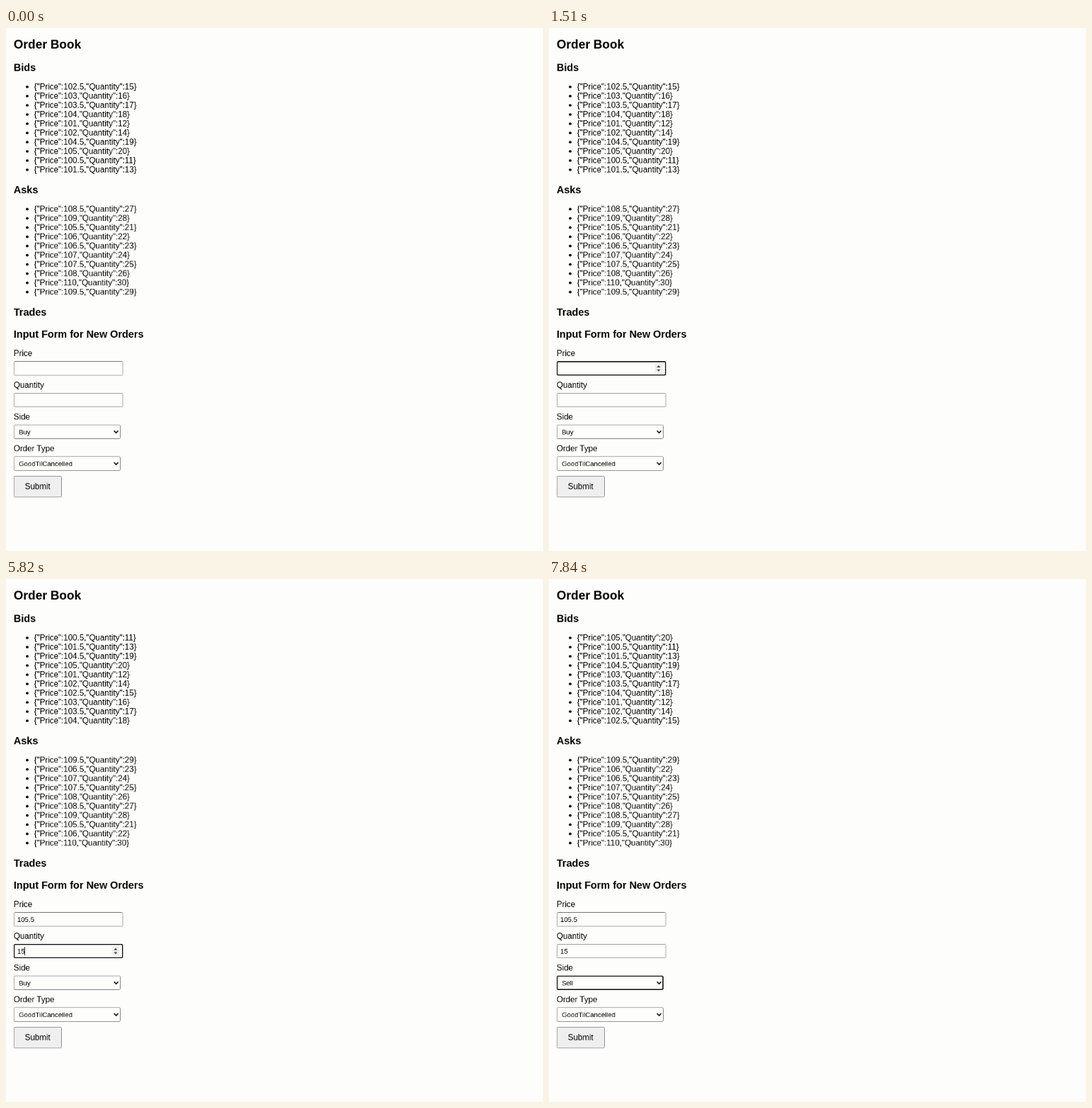
These frames come from a looping animation (759 px wide and 738 px high, 8 s). An HTML page:

```html
<!DOCTYPE html>
<html lang="en">
<head>
<meta charset="utf-8">
<title>Order Book</title>
<style>
  html, body { margin: 0; width: 100%; height: 100%; overflow: hidden; background: #fdfdfc; }
  /* Painted at full size, then scaled down as one layer */
  svg {
    display: block; width: 1051px; height: 1022px; background: #fdfdfc;
    transform: scale(.7222); transform-origin: 0 0; will-change: transform;
  }
  text { font: 16px "Liberation Sans", Arial, sans-serif; fill: #000; white-space: pre; }
  .h2 { font-size: 24px; font-weight: bold; }
  .h3 { font-size: 20px; font-weight: bold; }
  .small { font-size: 13.333px; }
  .float { filter: drop-shadow(0 3px 5px rgba(0, 0, 0, .25)); }
</style>
</head>
<body>
<svg id="stage" viewBox="0 0 1051 1022"></svg>
<script>
const LOOP = 8000;
const LEFT = 15;
const stage = document.getElementById('stage');

function setAttrs(el, attrs) {
  for (const key in attrs) el.setAttribute(key, attrs[key]);
}

function add(tag, attrs, parent = stage) {
  const el = document.createElementNS('http://www.w3.org/2000/svg', tag);
  setAttrs(el, attrs);
  parent.appendChild(el);
  return el;
}

function label(x, y, str, cls = '', parent = stage) {
  const el = add('text', { x, y, class: cls }, parent);
  el.textContent = str;
  return el;
}

const show = (el, on) => el.setAttribute('visibility', on ? 'visible' : 'hidden');
const within = (t, ...spans) => spans.some(([from, to]) => t >= from && t < to);

function setText(el, str) {
  if (el.textContent !== str) el.textContent = str;
}

// Latest value of a [time, value] list
function at(steps, t) {
  let value = steps[0][1];
  for (const [time, next] of steps) if (t >= time) value = next;
  return value;
}

// Orders are listed by quantity; each price follows from it
const bids = [
  [0, [15, 16, 17, 18, 12, 14, 19, 20, 11, 13]],
  [2650, [11, 13, 19, 20, 12, 14, 15, 16, 17, 18]],
  [7630, [20, 11, 13, 19, 16, 17, 18, 12, 14, 15]]
];
const asks = [
  [0, [27, 28, 21, 22, 23, 24, 25, 26, 30, 29]],
  [2680, [29, 23, 24, 25, 26, 27, 28, 21, 22, 30]],
  [7660, [29, 22, 23, 24, 25, 26, 27, 28, 21, 30]]
];
const orderText = q => JSON.stringify({ Price: 95 + q / 2, Quantity: q });

function orderList(top) {
  return Array.from({ length: 10 }, (_, i) => {
    const y = top + 18 * i;
    add('circle', { cx: 41.5, cy: y - 5, r: 2.5 });
    return label(55, y, '');
  });
}

function box(y, width) {
  const frame = add('rect', { rx: 2, fill: 'none' });
  return (focus, hover) => {
    const line = focus ? 2 : 1;
    setAttrs(frame, {
      x: LEFT + line / 2, y: y + line / 2, width: width - line, height: 28 - line,
      stroke: focus ? '#101010' : hover ? '#4f4f4f' : '#767676',
      'stroke-width': line
    });
  };
}

function numberField(y) {
  const spinner = add('g', {});
  add('rect', { x: 207, y: y + 5, width: 15, height: 18, fill: '#efefef' }, spinner);
  add('path', {
    d: `M211 ${y + 12}l3.5 -4 3.5 4zM211 ${y + 16}l3.5 4 3.5 -4z`, fill: '#444'
  }, spinner);
  const frame = box(y, 214);
  const text = label(22, y + 19, '', 'small');
  const caret = add('rect', { y: y + 6, width: 1, height: 16 });
  return (value, focus, hover, blink) => {
    frame(focus, hover);
    setText(text, value);
    show(spinner, focus || hover);
    show(caret, blink);
    if (blink) caret.setAttribute('x', Math.floor(22 + text.getComputedTextLength()));
  };
}

function selectField(y) {
  const frame = box(y, 209);
  const text = label(25, y + 19, '', 'small');
  add('path', {
    d: `M211.5 ${y + 12}l4 4 4 -4`, fill: 'none', stroke: '#000', 'stroke-width': 2
  });
  return (value, focus, hover) => {
    frame(focus, hover);
    setText(text, value);
  };
}

label(LEFT, 40, 'Order Book', 'h2');
label(LEFT, 84, 'Bids', 'h3');
const bidRows = orderList(120);
label(LEFT, 323, 'Asks', 'h3');
const askRows = orderList(359);
label(LEFT, 562, 'Trades', 'h3');
label(LEFT, 605, 'Input Form for New Orders', 'h3');

['Price', 'Quantity', 'Side', 'Order Type'].forEach((name, i) => label(LEFT, 641 + 62 * i, name));
const price = numberField(651);
const quantity = numberField(713);
const side = selectField(775);
const type = selectField(837);

add('rect', { x: 15.5, y: 875.5, width: 93, height: 41, rx: 2, fill: '#efefef', stroke: '#767680' });
label(37, 901, 'Submit');

const tip = add('g', { class: 'float' });
add('rect', { x: 161, y: 745, width: 184, height: 33, rx: 2, fill: '#262728' }, tip);
label(172, 767, 'Please fill out this field.', '', tip).style.fill = '#fff';

const menu = add('g', { class: 'float' });
const menuBack = add('rect', { x: LEFT, y: 803, width: 209, height: 36 }, menu);
const menuItems = add('g', {}, menu);
const menuMark = add('rect', { x: LEFT, width: 209, height: 18, fill: '#1967d2' }, menuItems);
const options = ['Buy', 'Sell'].map((name, i) => label(25, 817 + 18 * i, name, 'small', menuItems));

const priceTyping = [[0, ''], [1730, '1'], [1870, '10'], [2150, '105'], [2330, '105.'], [2840, '105.5']];
const quantityTyping = [[0, ''], [4430, '1'], [4620, '15']];

function draw(t) {
  at(bids, t).forEach((q, i) => setText(bidRows[i], orderText(q)));
  at(asks, t).forEach((q, i) => setText(askRows[i], orderText(q)));

  price(at(priceTyping, t), within(t, [1510, 4230]), within(t, [730, 1510]),
    within(t, [1730, 3290], [3880, 4230]));
  quantity(at(quantityTyping, t), within(t, [4230, 6990]), within(t, [520, 730], [3440, 4230]),
    within(t, [4430, 5220], [5820, 6440]));
  side(t < 7840 ? 'Buy' : 'Sell', t >= 7840, within(t, [440, 520], [6640, 6990]));
  type('GoodTilCancelled', false, within(t, [360, 440]));

  show(tip, within(t, [4060, 4230]));
  tip.setAttribute('opacity', t < 4090 ? .5 : 1);

  // The menu opens dark for a moment before its items are painted
  const open = within(t, [6990, 7840]);
  const painted = open && t >= 7020;
  const chosen = t < 7280 ? 0 : 1;
  show(menu, open);
  show(menuItems, painted);
  menuBack.setAttribute('fill', painted ? '#fff' : '#262728');
  menuMark.setAttribute('y', 803 + 18 * chosen);
  options.forEach((el, i) => { el.style.fill = i === chosen ? '#fff' : '#000'; });
}

const start = performance.now();
function tick() {
  draw((performance.now() - start) % LOOP);
  requestAnimationFrame(tick);
}
tick();
</script>
</body>
</html>
```
